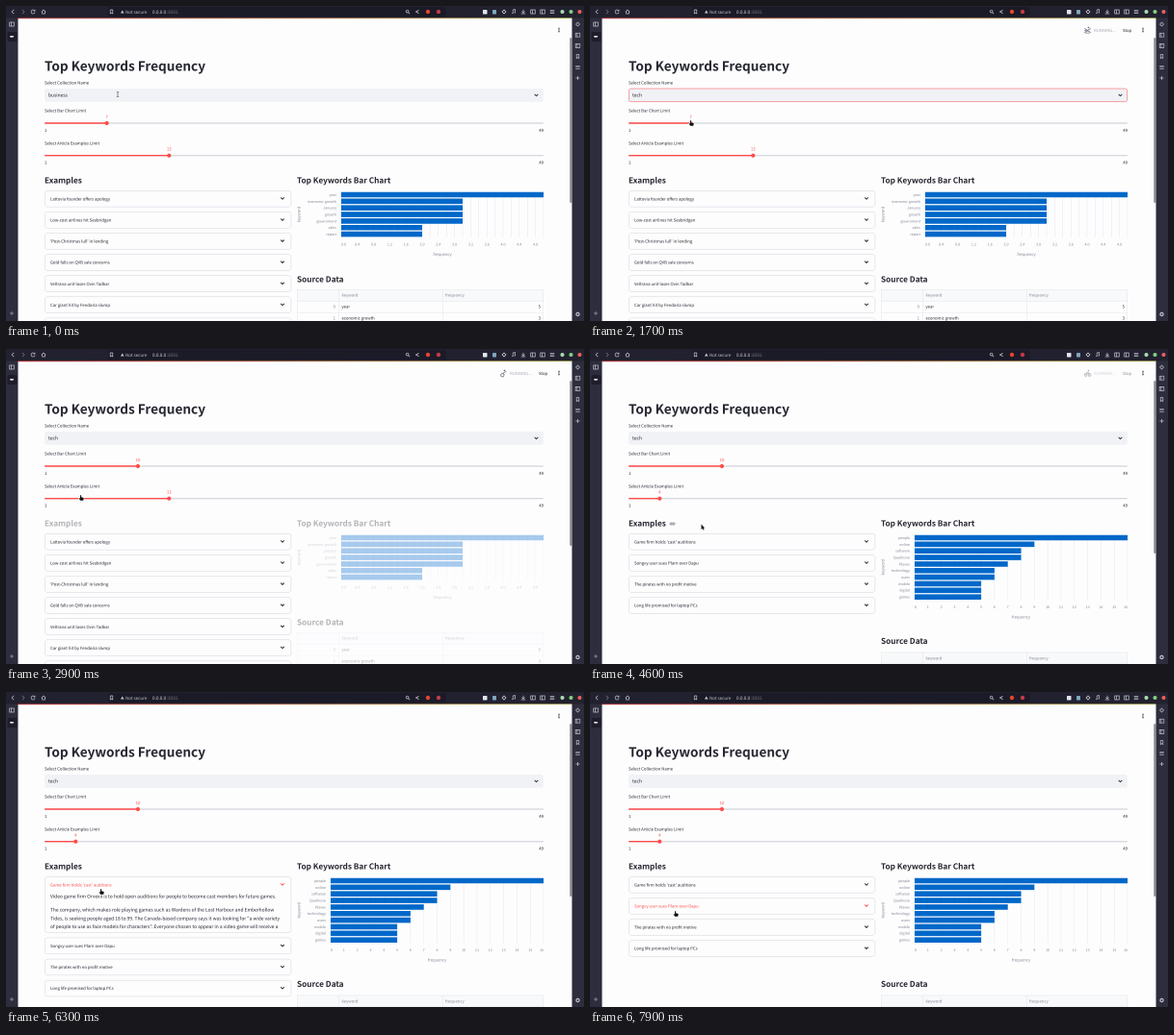
Animation, 600 px wide and 328 px high, one loop 8000 ms. Source, as an HTML page with a canvas:

```html
<!DOCTYPE html>
<html lang="en">
<head>
<meta charset="utf-8">
<title>Top Keywords Frequency</title>
<style>
html, body { margin: 0; overflow: hidden; background: #2e2d3d; }
canvas { display: block; width: 600px; height: 328px; }
</style>
</head>
<body>
<canvas id="stage"></canvas>
<script>
const LOOP = 8000;
const INK = '#262730', GREY = '#858895', RED = '#ff4b4b', BLUE = '#0068c9', PAGE = '#fdfdfe';
const TOP = '#22212f', SIDE = '#2e2d3d', ICON = '#c3c4cf';
const canvas = document.getElementById('stage');
const ctx = canvas.getContext('2d');
// Twice the resolution, so that small type sits between whole pixels.
const scale = 2 * (window.devicePixelRatio || 1);
canvas.width = 600 * scale;
canvas.height = 328 * scale;

const clamp = v => Math.max(0, Math.min(1, v));
const ramp = (t, a, b) => clamp((t - a) / (b - a));
const smooth = p => p * p * (3 - 2 * p);
const easeOut = p => 1 - (1 - p) ** 5;

function faded(alpha, draw) {
  ctx.save();
  ctx.globalAlpha *= alpha;
  draw();
  ctx.restore();
}

// Type is set at ten times its size and scaled down, so that small advances stay exact.
function text(s, x, y, size = 4.76, color = INK, align = 'left', weight = 400) {
  ctx.save();
  ctx.translate(x, y);
  ctx.scale(.1, .1);
  ctx.font = `${weight} ${size * 8.96}px "Noto Sans CJK JP", "Noto Sans CJK SC", "Noto Sans CJK", "Open Sans", sans-serif`;
  ctx.textRendering = 'geometricPrecision';
  ctx.textAlign = align;
  ctx.fillStyle = color;
  ctx.fillText(s, 0, 0);
  ctx.restore();
}
const heading = (s, x, y, size = 9.2) => text(s, x, y, size, INK, 'left', 700);

function rect(x, y, w, h, fill, radius = 0, stroke, width = .5) {
  ctx.beginPath();
  ctx.roundRect(x, y, w, h, radius);
  if (fill) { ctx.fillStyle = fill; ctx.fill(); }
  if (stroke) { ctx.strokeStyle = stroke; ctx.lineWidth = width; ctx.stroke(); }
}

function dot(x, y, r, color) {
  ctx.beginPath();
  ctx.arc(x, y, r, 0, 7);
  ctx.fillStyle = color;
  ctx.fill();
}

function path(d, x, y, stroke, width = .7, fill) {
  ctx.save();
  ctx.translate(x, y);
  const shape = new Path2D(d);
  if (fill) { ctx.fillStyle = fill; ctx.fill(shape); }
  if (stroke) {
    ctx.strokeStyle = stroke;
    ctx.lineWidth = width;
    ctx.lineCap = ctx.lineJoin = 'round';
    ctx.stroke(shape);
  }
  ctx.restore();
}

const GLYPH = {
  back: 'M1 -2L-1 0L1 2', next: 'M-1 -2L1 0L-1 2',
  reload: 'M1.8 -1A2 2 0 1 0 2 .6M2 -2V-.8H.8',
  home: 'M-2 0L0 -2L2 0M-1.4 -.4V2H1.4V-.4',
  mark: 'M-1.3 -2H1.3V2L0 1L-1.3 2Z',
  panel: 'M-2.3 -2H2.3V2H-2.3ZM-.6 -2V2',
  zoom: 'M1 -.4A1.4 1.4 0 1 1 -1.8 -.4A1.4 1.4 0 1 1 1 -.4M.7 .7L2 2',
  share: 'M-1.6 0L1.4 -1.5M-1.6 0L1.4 1.5',
  save: 'M0 -2V1M-1.4 -.3L0 1L1.4 -.3M-2 2H2',
  note: 'M-.8 1.5V-2L1.6 -2.4V1M-1.7 1.5H-.8M.7 1H1.6',
  plus: 'M-1.8 0H1.8M0 -1.8V1.8',
  lines: 'M-2 -1.5H2M-2 0H2M-2 1.5H2',
  star: 'M0 -2L2 0L0 2L-2 0Z',
  warn: 'M0 -1.6L1.8 1.5H-1.8Z',
  down: 'M-1.5 -.8L0 .7L1.5 -.8', up: 'M-1.5 .7L0 -.8L1.5 .7',
  link: 'M-.4 -1H-1.6A1 1 0 0 0 -1.6 1H-.4M.4 -1H1.6A1 1 0 0 1 1.6 1H.4M-1.2 0H1.2'
};
const icon = (name, x, y, color = ICON, width) => path(GLYPH[name], x, y, color, width);

function browser(t) {
  rect(0, 0, 600, 328, SIDE);
  rect(0, 0, 600, 12.5, TOP);
  rect(12.5, 12.5, 575, 316, PAGE);
  const strip = ctx.createLinearGradient(12, 0, 588, 0);
  strip.addColorStop(0, RED);
  strip.addColorStop(1, '#fffd80');
  rect(12.5, 12.5, 575, .7, strip);

  rect(106, 1, 351, 10.3, '#1b1a27', 2);
  icon('back', 7, 6); icon('next', 18, 6, '#777885'); icon('reload', 28, 6); icon('home', 39, 6);
  icon('mark', 109.5, 6);
  path(GLYPH.warn, 120.8, 6, null, 0, ICON);
  text('Not secure', 124, 7.8, 5, ICON);
  text('0.0.0.0', 152, 7.8, 5.2, '#d6d7df');
  text(':8501', 167, 7.8, 5.2, '#777885');
  icon('zoom', 417, 6); icon('share', 427, 6);
  dot(438, 6, 2.2, '#e5452f');
  dot(449, 6, 2.2, '#c33b4a');
  rect(495, 4, 4.5, 4.5, '#dfe5f4', .6);
  rect(505, 4, 4, 4.5, '#7fa6bd', .6);
  icon('star', 517, 6, '#e9e9ef'); icon('note', 527, 6); icon('save', 537, 6);
  icon('panel', 547, 6); icon('panel', 557, 6); icon('lines', 567, 6);
  dot(577.5, 6, 2, '#a9dcb0'); dot(586.5, 6, 2, '#83d07f'); dot(595.5, 6, 2, '#ea5f5c');

  icon('panel', 6, 19);
  rect(1.5, 27, 10, 10, '#1e1d2a', 2);
  rect(4, 31, 4, 1.6, '#e9e9ef', .8);
  icon('plus', 6, 320, '#9a9ba8');
  ['star', 'panel', 'panel', 'mark', 'lines', 'plus'].forEach((name, i) => icon(name, 593.5, 19 + i * 11.2));
  dot(593.5, 321, 2.2, ICON);
  dot(593.5, 321, 1, SIDE);
  if (!listOpen(t)) rect(585.3, 33, 1.9, t < NEW_DATA ? 172 : 180, '#8c8c90', 1);
}

const FIGURES = [
  'M-3 -2L3 2M-3 2L3 -2M-2 2.6H2M-3 0H-1.5',
  'M1 -1.2L-1 0L.6 1L.2 2.8M-1 0A1.7 1.7 0 1 0 .4 2.4M1 -1.2L2.6 -2',
  'M-.5 1.4A1.4 1.4 0 1 1 -3.3 1.4A1.4 1.4 0 1 1 -.5 1.4M3.5 1.4A1.4 1.4 0 1 1 .7 1.4A1.4 1.4 0 1 1 3.5 1.4M-1.8 1.2L-.6 -1L1 0L2 1.2M-.6 -1L1.2 -1.4'
];
function status(t) {
  faded(ramp(t, 1300, 1500) * (1 - ramp(t, 4400, 4800)), () => {
    const pose = t < 2700 ? 0 : t < 3600 ? 1 : 2;
    path(FIGURES[pose], 516.5, 25.5, '#77798a', .8);
    dot(517.5, 22.4, .9, '#77798a');
    text('RUNNING...', 523, 26.8, 4.76, '#a9abb6');
    text('Stop', 553, 26.8);
  });
  for (let i = -1; i < 2; i++) dot(574, 25 + i * 1.7, .65, INK);
}

const OPTIONS = ['sport', 'tech', 'business', 'entertainment', 'politics'];
const OPEN_LIST = 400, PICK = 1200, NEW_DATA = 4300;
const listOpen = t => t >= OPEN_LIST && t < PICK;

function selectBox(t) {
  const focused = t >= OPEN_LIST && t < 2000;
  text('Select Collection Name', 40, 81.6);
  rect(40.2, 86, 517.6, 13.8, '#f0f2f6', 2.5, focused && RED);
  text(t < PICK ? 'business' : 'tech', 44, 94.7, 5.44);
  icon('down', 550.5, 93, INK, 1);
}

function dropdown(t) {
  if (!listOpen(t)) return;
  ctx.save();
  ctx.shadowColor = 'rgba(0,0,0,.3)';
  ctx.shadowBlur = 5 * scale;
  ctx.shadowOffsetY = 1.5 * scale;
  rect(40, 100, 518, 69, '#fff', 2);
  ctx.restore();
  rect(40, (t < 950 ? 127.2 : 113.5), 518, 13.7, '#f0f2f6');
  OPTIONS.forEach((name, i) => text(name, 46, 108.4 + i * 13.75, 5.44));
}

function slider(label, value, y) {
  const x = 40 + (value - 1) / 48 * 517;
  text(label, 40, y - 11.3);
  rect(40, y - .7, 518, 1.4, '#dadbe0', .7);
  rect(40, y - .7, x - 40, 1.4, RED, .7);
  dot(x, y, 2.1, RED);
  text(value, x, y - 5, 4.76, RED, 'center');
  text('1', 40, y + 9);
  text('49', 558, y + 9, 4.76, INK, 'right');
}

const BUSINESS = {
  left: 348, max: 5, tick: .4, grid: .2, digits: 1, source: 287.3, table: 295,
  bars: { year: 5, 'economic growth': 3, January: 3, growth: 3, government: 3, sales: 2, report: 2 },
  examples: ['Lattovia founder offers apology', 'Low-cost airlines hit Seabridgen', "'Post-Christmas lull' in lending",
    'Gold falls on QVB sale concerns', 'Veltrana unit loses Ovin Tadkar', 'Car giant hit by Fendoria slump', '']
};
const TECH = {
  left: 337, max: 16, tick: 1, grid: 1, digits: 0, source: 307.2, table: 315.8,
  bars: { people: 16, online: 9, software: 8, Quellnore: 8, Plovex: 7, technology: 6, users: 6, mobile: 5, digital: 5, games: 5 },
  examples: ["Game firm holds 'cast' auditions", 'Songvy user sues Plarn over Dapu',
    'The pirates with no profit motive', 'Long life promised for laptop PCs']
};
const ARTICLES = [
`Video game firm Orvexil is to hold open auditions for people to become cast members for future games.

The company, which makes role playing games such as Wardens of the Lost Harbour and Emberhollow
Tides, is seeking people aged 18 to 99. The Canada-based company says it was looking for "a wide variety
of people to use as face models for characters". Everyone chosen to appear in a video game will receive a
fee for the work and a copy of the finished game.

The auditions are open to all, and no acting skill is needed. People who want to take part are asked to
bring a recent picture and to be ready to have their face measured and scanned.

The firm said the faces would be used for heroes and villains as well as for the crowds in its towns.
It hopes that a broad mix of people will make its worlds look more like the real one.`,
`A user of the online music service is suing its maker, saying the firm has broken competition laws.

He says the songs he has bought can only be played on one brand of player, which forces people to buy
that player if they want to carry their music with them. The case was filed in a district court.

The firm sells songs in a protected form that other players on the market cannot read. The user says
this has let it keep hold of both the market for music downloads and the market for players.

He is asking for damages for himself and for others who have bought a player in the same way.
The company has not yet made any comment on the case.`
];

function chart({ left, max, tick, grid, digits, bars }) {
  const names = Object.keys(bars), step = 6.85, bottom = 193 + names.length * step;
  const at = v => left + v / max * (558 - left);
  for (let i = 0; i * grid <= max + .01; i++) rect(at(i * grid) - .2, 193, .4, bottom - 193, '#dfe3ec');
  for (let i = 0; i * tick <= max + .01; i++) {
    const v = i * tick, align = i === 0 ? 'left' : v === max ? 'right' : 'center';
    text(v.toFixed(digits), at(v), bottom + 8.4, 4.08, GREY, align);
  }
  names.forEach((name, i) => {
    rect(left, 193.7 + i * step, at(bars[name]) - left, 5.6, BLUE);
    text(name, left - 5, 197.9 + i * step, 4.08, GREY, 'right');
  });
  text('frequency', (left + 558) / 2, bottom + 19, 4.6, GREY, 'center');
  ctx.save();
  ctx.translate(305.5, (193 + bottom) / 2);
  ctx.rotate(-Math.PI / 2);
  text('keyword', 0, 0, 4.6, GREY, 'center');
  ctx.restore();
}

function table({ table: top, bars }) {
  const line = '#e3e5ea';
  rect(302, top, 256, 12, '#f8f9fb');
  text('keyword', 348.5, top + 7.6, 4.7, GREY);
  text('frequency', 456, top + 7.6, 4.7, GREY);
  Object.entries(bars).slice(0, 3).forEach(([name, value], i) => {
    const y = top + 19.5 + i * 12;
    text(i, 342, y, 4.7, GREY, 'right');
    text(name, 348.5, y, 4.7);
    text(value, 555, y, 4.7, INK, 'right');
  });
  for (let i = 0; i < 4; i++) rect(302, top + i * 12, 256, .5, line);
  [302, 345, 453, 557.5].forEach(x => rect(x, top, .5, 60, line));
}

const FULL = 290;
const TOGGLES = [[5400, 6140], [6900, 7460]];
const HOVERS = [[5200, 6650], [6750, LOOP]];

function expanders(t, examples) {
  let y = 192.3;
  examples.forEach((title, i) => {
    const live = examples === TECH.examples && TOGGLES[i];
    const [open, close] = live || [LOOP, LOOP];
    const body = FULL * (easeOut(ramp(t, open, open + 500)) - easeOut(ramp(t, close, close + 500)));
    const color = live && t >= HOVERS[i][0] && t < HOVERS[i][1] ? RED : INK;
    rect(40.4, y, 255.5, 16.8 + body, null, 2.7, '#d3d4da');
    text(title, 46, y + 10.1, 4.76, color);
    icon(t >= open && t < close ? 'up' : 'down', 287, y + 8.2, color, 1);
    if (body > .2) {
      ctx.save();
      ctx.beginPath();
      ctx.rect(40, y + 16, 256, body);
      ctx.clip();
      let lineY = y + 22.2;
      for (const row of ARTICLES[i].split('\n')) {
        text(row, 46, lineY, 5.46);
        lineY += row ? 8.8 : 5.3;
      }
      ctx.restore();
    }
    y += 22.1 + body;
  });
}

// time, x, y, shape from that time on
const MOVES = [
  [0, 116, 92, 'beam'], [300, 116, 92, 'beam'], [450, 115, 98, 'hand'], [900, 111, 113, 'hand'], [1200, 111, 120, 'hand'],
  [1700, 105, 122, 'hand'], [1950, 105, 122, 'hand'], [2400, 137, 122, 'hand'], [2600, 137, 122, 'hand'],
  [2900, 78, 155, 'hand'], [3300, 78, 155, 'arrow'], [4000, 108, 212, 'arrow'], [4500, 116, 185, 'arrow'],
  [4900, 116, 185, 'arrow'], [5200, 99, 206, 'hand'], [6300, 99, 208, 'hand'], [6500, 99, 208, 'hand'],
  [6850, 89, 229, 'hand'], [7900, 89, 231, 'hand'], [LOOP, 89, 231, 'hand']
];
const CURSORS = {
  beam: 'M-1 -2.5H1M0 -2.5V2.5M-1 2.5H1',
  arrow: 'M-.5 -2.5V3L.8 1.9L1.7 3.6L2.5 3.2L1.8 1.5H3.2Z',
  hand: 'M-1 -2.6Q-.4 -3.1 .1 -2.5V-.7L2.2 -.2Q2.8 0 2.7 .7L2.2 2.8H-.9L-2.3 .7Q-2 -.1 -1 .5Z'
};

function pointer(t) {
  const i = MOVES.findIndex(m => m[0] > t) - 1;
  const [a, x, y, shape] = MOVES[i], [b, x2, y2] = MOVES[i + 1];
  const p = smooth(ramp(t, a, b));
  return { x: x + (x2 - x) * p, y: y + (y2 - y) * p, shape };
}

function drawCursor({ x, y, shape }) {
  const d = CURSORS[shape];
  if (shape === 'beam') return path(d, x, y, '#444', .6);
  path(d, x, y, '#fff', 1.1);
  path(d, x, y, null, 0, '#111');
}

function draw(t) {
  ctx.setTransform(scale, 0, 0, scale, 0, 0);
  const data = t < NEW_DATA ? BUSINESS : TECH;
  const cursor = pointer(t);
  const fresh = t < NEW_DATA ? 1 - .66 * ramp(t, 2420, 2900) : 1;
  const limit = t < 1950 ? 7 : t < 2400 ? Math.round(1 + (cursor.x - 40) / 517 * 48) : 10;

  browser(t);
  status(t);
  heading('Top Keywords Frequency', 40, 67.4, 15.15);
  selectBox(t);
  slider('Select Bar Chart Limit', limit, 122);
  slider('Select Article Examples Limit', t < 3050 ? 13 : 4, 155.7);
  faded(fresh, () => {
    heading('Examples', 40, 184.7);
    heading('Top Keywords Bar Chart', 302, 184.7);
    chart(data);
    heading('Source Data', 302, data.source);
    table(data);
  });
  if (t >= 4350 && t < 4950) icon('link', 85.5, 182, GREY);
  expanders(t, data.examples);
  dropdown(t);
  drawCursor(cursor);
}

function frame() {
  draw(performance.now() % LOOP);
  requestAnimationFrame(frame);
}
frame();
</script>
</body>
</html>
```
